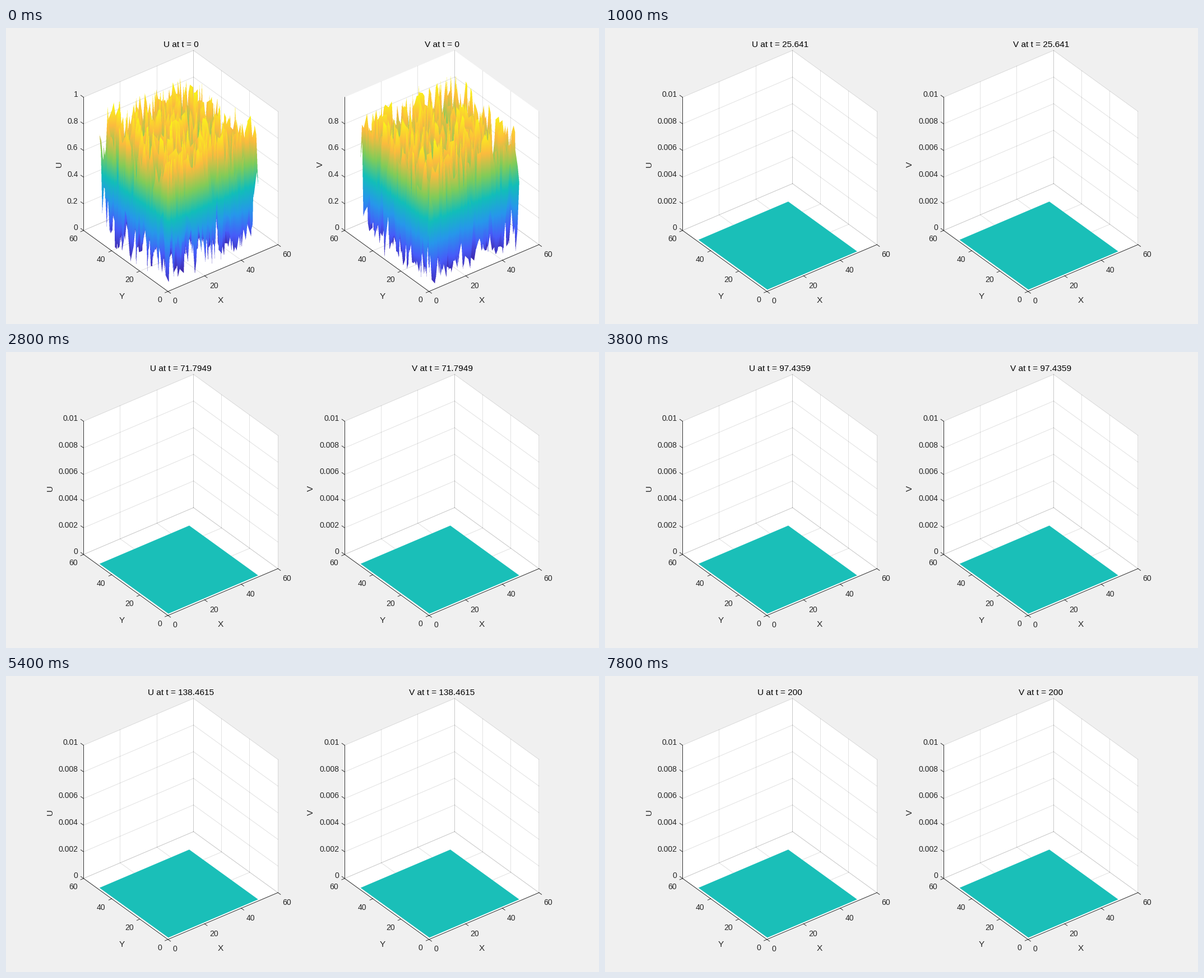
These frames come from a looping animation (1058x529 px, 8 s). A matplotlib script:

```python
import math
import numpy as np
import matplotlib.pyplot as plt
from matplotlib.animation import FuncAnimation
from matplotlib.colors import LinearSegmentedColormap

W, H, DPI = 1058, 529, 64
STEPS, T_END, N = 40, 200, 50
PT = 72 / DPI                      # points per pixel
INK, TEAL = "#262626", "#1abfb8"

# The projected unit cube of the view is stretched to fill each panel.
AZ, EL = math.radians(37.5), math.radians(30)
LEFT, BOTTOM, BOX_W, BOX_H, PANEL_DX = 137.9, 470.3, 346.7, 430.7, 465.8
SPAN_X = math.cos(AZ) + math.sin(AZ)
SPAN_Y = SPAN_X * math.sin(EL) + math.cos(EL)
SX, SY = BOX_W / SPAN_X, BOX_H / SPAN_Y

CMAP = LinearSegmentedColormap.from_list("surf", [
    "#3e26a8", "#475bf9", "#2797eb", "#12beb9", "#81cc59", "#fcbb3e", "#f9fb15"],
    N=512)

plt.rcParams["font.family"] = "Liberation Sans"


def project(x, y, z=0.0, dx=0.0):
    """Axis units (x, y to 60, z to 1) to stage pixels."""
    x, y = x / 60, y / 60
    px = LEFT + dx + SX * (math.cos(AZ) * x + math.sin(AZ) * (1 - y))
    py = BOTTOM - SY * (math.sin(EL) * (math.sin(AZ) * x + math.cos(AZ) * y)
                        + math.cos(EL) * z)
    return px, py


def noise(seed, left, right):
    """Uniform noise with the heights of the two side corners given."""
    z = np.random.default_rng(seed).uniform(0, 1, (N, N))
    z[-1, 0], z[0, -1] = left, right
    return z


def fill_triangle(buf, p, z):
    (x0, y0), (x1, y1), (x2, y2) = p
    area = (x1 - x0) * (y2 - y0) - (x2 - x0) * (y1 - y0)
    if abs(area) < 1e-6:
        return
    xa, xb = math.ceil(min(x0, x1, x2)), int(max(x0, x1, x2)) + 1
    ya, yb = math.ceil(min(y0, y1, y2)), int(max(y0, y1, y2)) + 1
    gx = np.arange(xa, xb)[None, :] - x0
    gy = np.arange(ya, yb)[:, None] - y0
    b1 = (gx * (y2 - y0) - gy * (x2 - x0)) / area
    b2 = (gy * (x1 - x0) - gx * (y1 - y0)) / area
    inside = (b1 >= 0) & (b2 >= 0) & (b1 + b2 <= 1)
    level = z[0] + b1 * (z[1] - z[0]) + b2 * (z[2] - z[0])
    buf[ya:yb, xa:xb][inside] = level[inside]


def render_surfaces(fields, s=3):
    """Paint the height fields back to front, coloured by height."""
    buf = np.full((H * s, W * s), np.nan)
    x, y = np.meshgrid(np.arange(1, N + 1), np.arange(1, N + 1))
    for k, z in enumerate(fields):
        px, py = project(x, y, z, k * PANEL_DX)
        pts = np.stack([(px + .5) * s - .5, (py + .5) * s - .5], axis=-1).tolist()
        zs = z.tolist()
        for r in range(N - 2, -1, -1):
            for c in range(N - 2, -1, -1):
                for tip in ((r + 1, c + 1), (r, c)):
                    tri = (tip, (r + 1, c), (r, c + 1))
                    fill_triangle(buf, [pts[a][b] for a, b in tri],
                                  [zs[a][b] for a, b in tri])
    solid = ~np.isnan(buf)
    rgba = CMAP(np.nan_to_num(buf)) * solid[..., None]
    rgba = rgba.reshape(H, s, W, s, 4).mean(axis=(1, 3))
    rgba[..., :3] /= np.maximum(rgba[..., 3:], 1e-6)
    return np.clip(rgba, 0, 1)


fig = plt.figure(figsize=(W / DPI, H / DPI), dpi=DPI, facecolor="#f0f0f0")
ax = fig.add_axes([0, 0, 1, 1])
ax.axis("off")


def line(a, b, color=INK, alpha=1.0, z=5):
    xs, ys = zip(a, b)
    if xs[0] == xs[1]:             # keep upright lines on whole pixels
        xs = np.round(xs)
    return ax.plot(xs, ys, color=color, alpha=alpha, lw=.9 * PT, zorder=z,
                   snap=False, solid_capstyle="projecting")[0]


def grid(a, b):
    return line(a, b, alpha=.15, z=2)


def text(x, y, s, size=14, color=INK, ha="center", va="baseline", **kw):
    return ax.text(x, y, s, fontsize=size * PT, color=color, ha=ha, va=va,
                   zorder=6, **kw)


class Panel:
    def __init__(self, name, dx, has_top):
        self.name, self.dx, self.has_top = name, dx, has_top
        p = lambda x, y, z=0: project(x, y, z, dx)
        box = [p(0, 60, 1), p(60, 60, 1), p(60, 0, 1), p(60, 0), p(0, 0), p(0, 60)]
        ax.fill(*zip(*box), color="white", lw=0, zorder=1)

        for v in range(0, 61, 20):
            grid(p(v, 0), p(v, 60))
            grid(p(v, 60), p(v, 60, 1))
            grid(p(0, v), p(60, v))
            grid(p(60, v), p(60, v, 1))
            x, y = p(v, 0)
            line((x, y), (x + 4.7, y + 3.3))
            text(x + 8.5, y + 21.7, str(v), ha="left")
            x, y = p(0, v)
            line((x, y), (x - 5.3, y + 2.3))
            text(x - 11, y + 19.5, str(v), ha="right")

        self.ztext = []
        for z in np.linspace(0, 1, 6):
            x, y = p(0, 60, z)
            self.top = [grid(p(0, 60, z), p(60, 60, z)),
                        grid(p(60, 60, z), p(60, 0, z)),
                        line((x, y), (x - 5, y - 3.5)),
                        text(x - 10, y - .5, "", ha="right")]
            self.ztext.append(self.top[-1])

        line(p(0, 60, 1), p(0, 60))
        line(p(0, 60), p(0, 0))
        line(p(0, 0), p(60, 0))

        corners = [p(1, 1), p(N, 1), p(N, N), p(1, N)]
        self.plane = ax.fill(*zip(*corners), color=TEAL, lw=0, zorder=3)[0]
        text(382 + dx, 490.5, "X", 15.4)
        text(206 + dx, 483.5, "Y", 15.4)
        self.zlabel = text(0, 243, name, 15.4, va="center", rotation=90)
        self.title = text(311.7 + dx, 34, "", 15.4, "black")

    def show(self, t, first):
        stamp = f"{t:.4f}".rstrip("0").rstrip(".")
        self.title.set_text(f"{self.name} at t = {stamp}")
        for i, label in enumerate(self.ztext):
            label.set_text(f"{i * (.2 if first else .002):.4g}")
        self.zlabel.set_x((94.5 if first else 78) + self.dx)
        self.plane.set_visible(not first)
        for art in self.top:
            art.set_visible(self.has_top or not first)


panels = [Panel("U", 0, True), Panel("V", PANEL_DX, False)]
fields = [noise(4, .79, .49), noise(11, .61, .52)]
surface = ax.imshow(render_surfaces(fields), extent=(-.5, W - .5, H - .5, -.5),
                    interpolation="nearest", aspect="auto", zorder=4)
ax.set_xlim(-.5, W - .5)
ax.set_ylim(H - .5, -.5)


def update(k):
    first = k == 0
    surface.set_visible(first)
    for panel in panels:
        panel.show(k * T_END / (STEPS - 1), first)
    return []


anim = FuncAnimation(fig, update, frames=STEPS, interval=200, repeat=True,
                     repeat_delay=0, init_func=lambda: update(0), blit=False)
plt.show()
```
